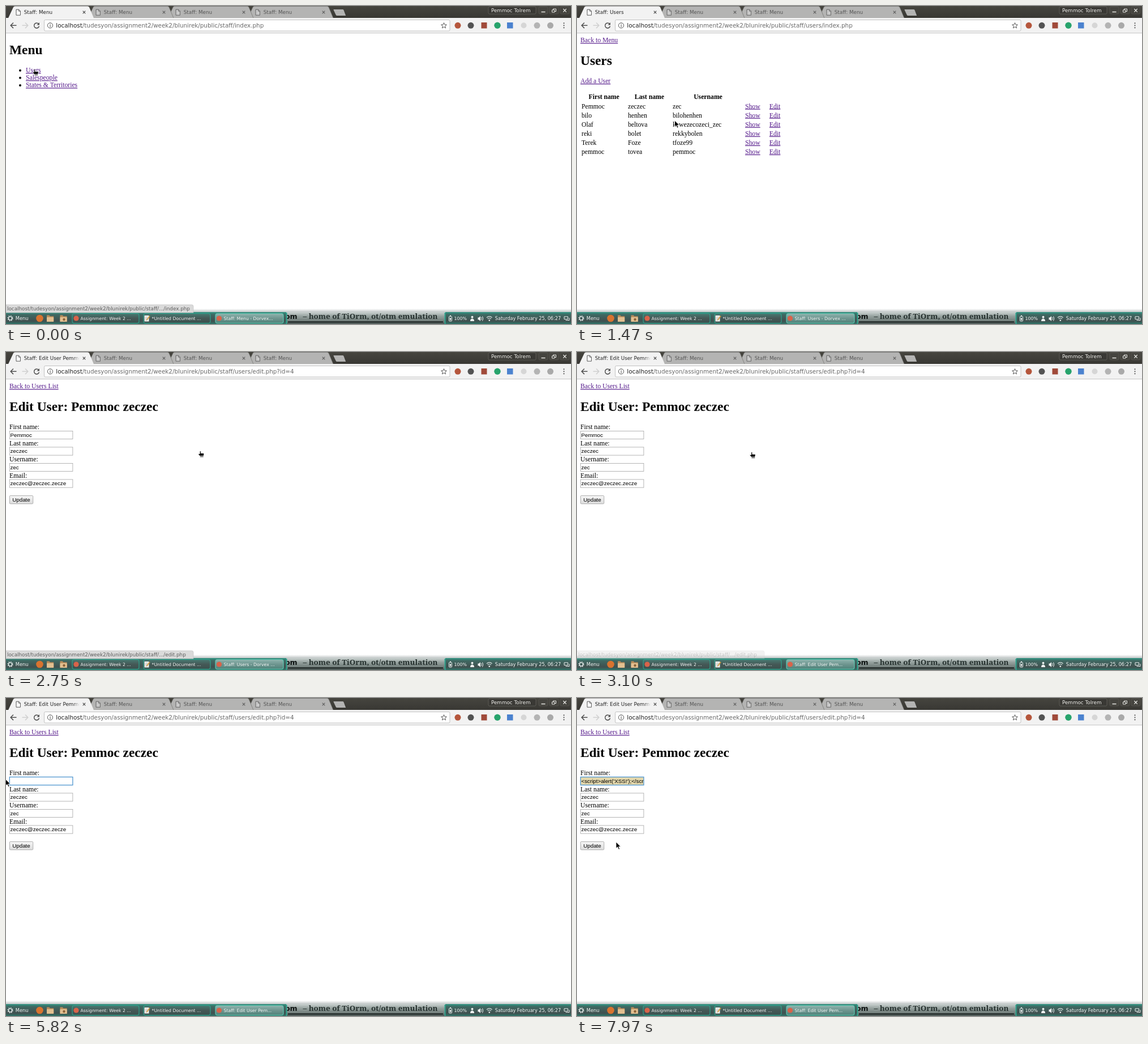
An HTML page for the animation above (8000 ms loop, 998x561 px).

```html
<!DOCTYPE html>
<html lang="en">
<head>
<meta charset="utf-8">
<title>Staff</title>
<style>
html, body { margin: 0; width: 100%; height: 100%; overflow: hidden; background: #fff; }
svg { display: block; width: 100vw; height: 100vh; }
text { white-space: pre; }
.serif { font-family: "Liberation Serif", "Times New Roman", serif; }
.sans { font-family: "Liberation Sans", Arial, sans-serif; }
.ui { font-family: "DejaVu Sans", sans-serif; }
.book { font-family: "Noto Serif", serif; }
</style>
</head>
<body>
<svg id="stage" viewBox="0 0 998 561" preserveAspectRatio="none" xmlns="http://www.w3.org/2000/svg"></svg>
<script>
const LOOP = 8000;
const BASE = "/tudesyon/assignment2/week2/blunirek/public/staff/";
const FIRST = "Pemmoc", LAST = "zeczec";
const SCRIPT = "<script>alert('XSS!');<\/script>";
const LINK = "#551a8b";

// Markup helpers
const esc = s => s.replace(/&/g, "&amp;").replace(/</g, "&lt;");
const text = (x, y, s, size, cls, attrs = "") =>
  `<text x="${x}" y="${y}" font-size="${size}" class="${cls}" ${attrs}>${esc(s)}</text>`;
const serif = (x, y, s, attrs) => text(x, y, s, 11.69, "serif", attrs);
const link = (x, y, s) => serif(x, y, s, `fill="${LINK}" text-decoration="underline"`);
const heading = (y, s) => text(6, y, s, 23.38, "serif", 'font-weight="700"');
const field = (x, y, s, attrs) => text(x, y, s, 9.74, "sans", attrs);
const rect = (x, y, w, h, fill, attrs = "") =>
  `<rect x="${x}" y="${y}" width="${w}" height="${h}" fill="${fill}" ${attrs}/>`;
const circle = (x, y, r, fill, attrs = "") => `<circle cx="${x}" cy="${y}" r="${r}" fill="${fill}" ${attrs}/>`;
const line = (d, stroke, w = 1) => `<path d="${d}" fill="none" stroke="${stroke}" stroke-width="${w}"/>`;
const shape = (d, fill, attrs = "") => `<path d="${d}" fill="${fill}" ${attrs}/>`;
const group = (id, body, attrs = "") => `<g id="${id}" ${attrs}>${body}</g>`;
const ramp = (id, stops, dir = 'x2="0" y2="1"') => `<linearGradient id="${id}" ${dir}>` +
  stops.map(([o, c, a = 1]) => `<stop offset="${o}" stop-color="${c}" stop-opacity="${a}"/>`).join("") +
  "</linearGradient>";

const defs = "<defs>" +
  ramp("frame", [[0, "#46453f"], [1, "#383733"]]) +
  ramp("fade", [[0, "#222"], [.88, "#222"], [1, "#222", 0]], 'gradientUnits="userSpaceOnUse" x1="32" x2="130" y1="0" y2="0"') +
  ramp("shadow", [[0, "#455", 0], [1, "#455", .4]]) +
  ramp("panel", [[0, "#2f9683"], [.22, "#3f6862"], [.75, "#40504f"], [1, "#2d7468"]]) +
  ramp("wall", [[0, "#c9d1cf"], [.35, "#95a19e"], [.75, "#717d7a"], [1, "#4a5553"]]) +
  ramp("button", [[0, "#477a72"], [.5, "#455856"], [1, "#3a524f"]]) +
  ramp("active", [[0, "#8fb4ae"], [.5, "#6e958f"], [1, "#4f837a"]]) +
  ramp("push", [[0, "#f6f6f6"], [1, "#dcdcdc"]]) +
  '<clipPath id="fieldClip"><rect x="6.5" y="139.5" width="111" height="14"/></clipPath>' +
  '<clipPath id="selClip"><rect id="selBox" y="140.5" height="12.5"/></clipPath></defs>';

// Browser window
function tab(i) {
  const x = 4 + 141 * i, on = i === 0;
  const d = `M${x} 21.3L${x + 9} 2Q${x + 10} .5 ${x + 12} .5H${x + 140}Q${x + 142} .5 ${x + 143} 2L${x + 151} 21.3Z`;
  const cx = 138 + 141 * i, px = 18 + 141 * i, ink = on ? "#444" : "#5d5d5d";
  return shape(d, on ? "#f2f2f2" : "#b4b4b3", on ? "" : 'stroke="#72726f" stroke-width=".7"') +
    shape(`M${px} 6.2h4.6l2.8 2.8v7.2h-7.4z`, on ? "#fff" : "#c9c9c9", `stroke="${ink}" stroke-width=".9"`) +
    line(`M${px + 4.5} 6.2v3h2.8`, ink, .8) +
    text(31.8 + 141 * i, 14, "Staff: Menu", 8.77, "ui", on ? 'id="tabTitle" fill="url(#fade)"' : 'fill="#555"') +
    line(`M${cx - 2.3} 8.7l4.6 4.6m0-4.6l-4.6 4.6`, ink, 1.1);
}

const windowButtons = [949, 968, 987].map(x =>
  rect(x - 8, 1.5, 16, 12.5, "#45443f", 'rx="2" stroke="#5c5b55" stroke-width=".7"')).join("") +
  line("M945.5 10.5h7", "#e8e8e4", 1.5) +
  line("M964.5 7h4.5v4h-4.5zM966.5 7v-2h5v4.5h-2.5", "#e8e8e4", 1) +
  line("M984.3 5l5.4 5.6m0-5.6l-5.4 5.6", "#e8e8e4", 1.3);

const toolbar = rect(0, 21, 998, 27, "#f2f2f2") + rect(0, 47.4, 998, .8, "#b9b9b9") +
  line("M18.5 34.3H8.5M13 29.5l-4.8 4.8l4.8 4.8", "#505050", 1.5) +
  line("M28.5 34.3H38.5M34 29.5l4.8 4.8l-4.8 4.8", "#d0d0d0", 1.5) +
  line("M57.5 31.5A4.5 4.5 0 1 0 58.5 35.5", "#505050", 1.5) + shape("M59 29v4.5h-4.5z", "#505050") +
  rect(67.5, 24.5, 716.5, 19.5, "#fff", 'rx="2" stroke="#b4b4b4" stroke-width=".8"') +
  circle(78, 34.3, 4.6, "none", 'stroke="#555" stroke-width="1"') +
  rect(77.5, 33.5, 1.1, 3.5, "#555") + rect(77.5, 31.5, 1.1, 1.2, "#555") +
  '<text y="38" x="88.3" font-size="10.37" class="ui" fill="#222">localhost<tspan id="url" fill="#6a6a6a"></tspan></text>' +
  shape("M773.5 29.5l1.4 3.3l3.5 .3l-2.7 2.3l.8 3.5l-3-1.9l-3 1.9l.8-3.5l-2.7-2.3l3.5-.3z", "#fff", 'stroke="#555" stroke-width="1"') +
  circle(798, 34.3, 5.5, "#b5563c") + circle(821, 34.3, 5.5, "#535353") +
  rect(839.5, 29, 10, 10.5, "#a04a3a") + circle(868, 34.3, 5.7, "#27a36c") +
  rect(885, 29, 10.5, 10.5, "#4b82cf") + circle(914.5, 34.3, 5, "#d6d6d6") +
  circle(938, 34.3, 5.5, "#b4b4b4") + circle(961.5, 34.3, 5.5, "#a9a9a9") +
  [30.3, 34.3, 38.3].map(y => circle(985.5, y, 1.1, "#505050")).join("");

const chrome = rect(0, 0, 998, 22, "url(#frame)") + [3, 2, 1].map(tab).join("") +
  shape("M578.5 6h16q1.5 0 2 1.2l3.7 9.8h-15.5q-1.5 0-2-1.2l-4-8.6q-.6-1.2 .3-1.2z", "#b4b4b3") +
  rect(852, 1.3, 84, 12.8, "#3a3935", 'rx="2" stroke="#65645e" stroke-width=".8"') +
  text(857, 10.9, "Pemmoc Tolrem", 8.77, "ui", 'fill="#f0f0ec"') +
  windowButtons + toolbar + tab(0);

// Views
const menuView = heading(85, "Menu") +
  ["Users", "Salespeople", "States & Territories"].map((s, i) =>
    circle(25, 113.7 + 13.15 * i, 2, "#000") + link(35, 117 + 13.15 * i, s)).join("");

const people = [
  [FIRST, LAST, "zec"], ["bilo", "henhen", "bilohenhen"], ["Olaf", "beltova", "kewezecozeci_zec"],
  ["reki", "bolet", "rekkybolen"], ["Terek", "Foze", "tfoze99"], ["pemmoc", "tovea", "pemmoc"]
];
const heads = [[47.7, "First name"], [127.8, "Last name"], [231.5, "Username"]];
const usersView = link(6, 64.3, "Back to Menu") + heading(104, "Users") + link(6, 136, "Add a User") +
  heads.map(([x, s]) => serif(x, 164.3, s, 'font-weight="700" text-anchor="middle"')).join("") +
  people.map((row, i) => {
    const y = 180.5 + 16.08 * i;
    return row.map((s, c) => serif([8, 90, 169][c], y, s)).join("") + link(297, y, "Show") + link(339.8, y, "Edit");
  }).join("");

const values = ["", LAST, "zec", "zeczec@zeczec.zecze"];
const inputs = ["First name:", "Last name:", "Username:", "Email:"].map((label, i) => {
  const y = 28.5 * i;
  return serif(6, 136 + y, label) +
    rect(6.3, 139.4 + y, 111.6, 14.2, "#fff", `stroke="#a3a3a3" stroke-width=".8" ${i ? "" : 'id="input"'}`) +
    field(7.5, 149.9 + y, values[i]);
}).join("");

const editView = link(6, 64.3, "Back to Users List") + heading(104, `Edit User: ${FIRST} ${LAST}`) + inputs +
  group("entry", field(7.5, 149.9, "", 'id="value"') +
    group("sel", rect(6, 140, 113, 14, "#3b8fd8") + field(7.5, 149.9, "", 'id="selValue" fill="#fff"'), 'clip-path="url(#selClip)"') +
    rect(0, 141, .8, 11, "#000", 'id="caret"'), 'clip-path="url(#fieldClip)"') +
  rect(6.3, 253.4, 41.4, 14.4, "url(#push)", 'rx="1.5" stroke="#9c9c9c" stroke-width=".8"') +
  field(27, 264, "Update", 'text-anchor="middle"') +
  group("popup", rect(6.3, 154.3, 164.4, 18.5, "#fff", 'id="option" stroke="#c6c6c6" stroke-width=".7"') +
    text(12.7, 166.5, SCRIPT, 8.72, "ui", 'font-weight="700"'));

const status = group("status", shape("", "#dadada", 'id="statusBox" stroke="#c4c4c4" stroke-width=".7"') +
  text(2, 537, "", 8.8, "ui", 'id="statusText" fill="#5c5c5c"'));

// Desktop panel
const task = (x, w, s, on) =>
  rect(x, 542.5, w, 17, on ? "url(#active)" : "url(#button)", `rx="3.5" stroke="${on ? "#5cc9b2" : "#2fa28d"}" stroke-width="1.2"`) +
  text(x + 14.5, 553.7, s, 7.75, "ui", `fill="#f4f7f6" ${on ? 'id="taskTitle"' : ""}`);
const folder = x => shape(`M${x} 545.5h4.5l1.2 1.7h6.5v9.8h-12.2z`, "#b98d5c") + rect(x, 549, 12.2, 8, "#e2bf90", 'rx=".8"');

const panel = rect(0, 534, 998, 7, "url(#shadow)") + rect(494, 540, 284, 21, "url(#wall)") +
  text(493, 552, "om", 12.5, "ui", 'font-weight="700" fill="#0c1110"') +
  text(524.5, 552, "\u2013 home of TiOrm, ot/otm emulation", 13.4, "book", 'font-weight="700" fill="#25302e"') +
  rect(498, 556.5, 274, 1.8, "#111817") +
  rect(0, 540, 495, 21, "url(#panel)") + rect(776, 540, 222, 21, "url(#panel)") +
  line("M495.5 541v20M775.5 541v20", "#2fa58f", 2) +
  circle(7.5, 551, 3, "none", 'stroke="#f0f4f3" stroke-width="1.2"') +
  circle(7.5, 551, 4.3, "none", 'stroke="#f0f4f3" stroke-width="1.6" stroke-dasharray="1.5 1.877"') +
  text(16.8, 553.9, "Menu", 8.3, "ui", 'fill="#f4f7f6"') +
  circle(59.5, 551, 6.3, "#d8732f") + folder(72) + folder(95.5) + circle(102.5, 553, 2.2, "#8a6238") +
  task(117, 118, "Assignment: Week 2 ...") + circle(124, 551, 4.6, "#d9634a") +
  task(243, 118, "*Untitled Document ...") + rect(244.5, 546, 8, 10.5, "#f2f2ee") +
  line("M246 549h5M246 551.5h5M246 554h4", "#9a9a9a", .7) + line("M248.5 554l5.5-7", "#d79a3c", 1.7) +
  task(370, 120, "", true) + circle(376.5, 551, 4.6, "#d9634a") +
  rect(782.5, 547.5, 5, 8.5, "none", 'rx="1" stroke="#eef2f1" stroke-width="1"') + rect(784, 545.8, 2, 1.5, "#eef2f1") +
  rect(784, 550, 2, 4.5, "#eef2f1") + text(791.5, 553.9, "100%", 7.9, "ui", 'fill="#f4f7f6"') +
  circle(823.5, 548.8, 2, "#eef2f1") + shape("M820 556q0-4.5 3.5-4.5t3.5 4.5z", "#eef2f1") +
  shape("M833.5 549.5h2l2.5-2.5v9l-2.5-2.5h-2z", "#eef2f1") +
  line("M839.5 549q1.5 2.5 0 5M841.5 547.5q2.5 4 0 8", "#eef2f1", 1) +
  line("M849 549.7q4.8-4 9.6 0M850.7 552q3.1-2.5 6.2 0", "#dbe4e2", 1.2) + circle(853.8, 554.6, 1.3, "#eef2f1") +
  text(863.8, 553.9, "Saturday February 25, 06:27", 8.1, "ui", 'fill="#f4f7f6"') +
  line("M986 548h6.5v4.5h-6.5zM988.5 554.5h6.5v-4.5", "#eef2f1", 1);

// Pointers, each drawn from its hot spot
const rim = 'stroke="#fff" stroke-width=".8" stroke-linejoin="round"';
const beam = "M-2.5-8H2.5M0-8V8M-2.5 8H2.5";
const pointers =
  group("arrow", shape("M0 0V11.2L2.7 8.8L4.6 13.2L6.5 12.4L4.7 8.2H8.2Z", "#000", rim)) +
  group("hand", shape("M-1.3 .8Q-.3-.5 .8 .8V4H5Q6.2 4.2 6.2 5.5L5.5 9H-1L-3.7 6Q-3.8 4.6-1.3 5Z", "#000", rim) +
    rect(-1, 9.2, 6.5, 2, "#222", rim)) +
  group("beam", line(beam, "#fff", 2) + line(beam, "#000", .9));

document.getElementById("stage").innerHTML = defs + rect(0, 0, 998, 561, "#fff") + group("menu", menuView) +
  group("users", usersView) + group("edit", editView) + chrome + panel + status + group("pointer", pointers);

const el = id => document.getElementById(id);
const show = (id, on) => el(id).setAttribute("display", on ? "inline" : "none");
const set = (id, attrs) => { for (const k in attrs) el(id).setAttribute(k, attrs[k]); };
const say = (id, s) => { if (el(id).textContent !== s) el(id).textContent = s; };
const clamp = v => Math.max(0, Math.min(1, v));

// Pointer moves: start time, end time, x, y reached
const moves = [
  [0, 0, 51, 111.5], [1190, 1550, 190, 215], [1820, 2250, 338.5, 175], [2250, 2580, 343.5, 174.5],
  [3020, 3380, 70, 189], [3610, 3930, 63, 143.5], [4230, 4520, -.5, 143.5],
  [6420, 6780, 50, 162], [7500, 7970, 69, 254]
];

function pointerAt(t) {
  let x = 0, y = 0;
  for (const [a, b, u, v] of moves) {
    if (t < a) break;
    const p = t >= b ? 1 : Math.floor((t - a) / 40) * 40 / (b - a);
    const k = p * p * (3 - 2 * p);
    x += (u - x) * k;
    y += (v - y) * k;
  }
  return [x, y];
}

function statusAt(t) {
  if (t < 360) return [BASE + ".../index.php", 331, 1];
  if (t < 1800) return [BASE + "users/index.php", 343, 1 - clamp((t - 1190) / 120)];
  return [BASE + ".../edit.php", 331, t < 2900 ? clamp((t - 2380) / 120) : 1 - clamp((t - 3020) / 120)];
}

function render(t) {
  const view = t < 870 ? "menu" : t < 2680 ? "users" : "edit";
  for (const id of ["menu", "users", "edit"]) show(id, id === view);
  say("url", BASE + (t < 820 ? "index.php" : t < 2630 ? "users/index.php" : "users/edit.php?id=4"));
  say("tabTitle", "Staff: " + { menu: "Menu", users: "Users", edit: "Edit User " + FIRST }[view]);
  say("taskTitle", "Staff: " + (t < 1020 ? "Menu - Dorvex..." : t < 2840 ? "Users - Dorvex ..." : "Edit User Pem..."));

  const [path, w, alpha] = statusAt(t);
  say("statusText", "localhost" + path);
  set("statusBox", { d: `M0 527H${w - 3}Q${w} 527 ${w} 530V541H0Z` });
  set("status", { opacity: alpha });

  const [x, y] = pointerAt(t);
  const dragging = t >= 4230 && t < 5270;
  const overField = view === "edit" && x > 6 && x < 118 && y > 139 && y < 240 && (y - 139) % 28.5 < 14.5;
  const hand = t < 1230 || (t >= 2290 && t < 3140);
  const kind = hand ? "hand" : dragging || overField ? "beam" : "arrow";
  for (const id of ["arrow", "hand", "beam"]) show(id, id === kind);
  set("pointer", { transform: `translate(${x} ${y})` });

  const filled = t >= 6660, hover = filled && t < 7540, focused = t >= 4230;
  const value = t < 5230 ? FIRST : t < 5950 ? "" : filled ? SCRIPT : "<";
  say("value", value);
  say("selValue", value);
  const from = hover ? 13 : dragging && t < 5230 ? Math.max(7.5, x) : 200;
  const to = hover ? 118 : 46;
  set("selBox", { x: from, width: Math.max(0, to - from) });
  set("input", {
    fill: filled ? "#e2d7ac" : "#fff",
    stroke: focused ? "#4f96cf" : "#a3a3a3",
    "stroke-width": focused ? 1.3 : .8
  });
  set("caret", { x: value ? 13.5 : 7.7 });
  show("caret", (t >= 5230 && t < 5820) || (t >= 5950 && !filled));
  show("popup", t >= 5990 && t < 7540);
  set("option", { fill: hover ? "#c8c8c8" : "#fff" });
}

const start = performance.now();
function tick() {
  render((performance.now() - start) % LOOP);
  requestAnimationFrame(tick);
}
tick();
</script>
</body>
</html>
```
